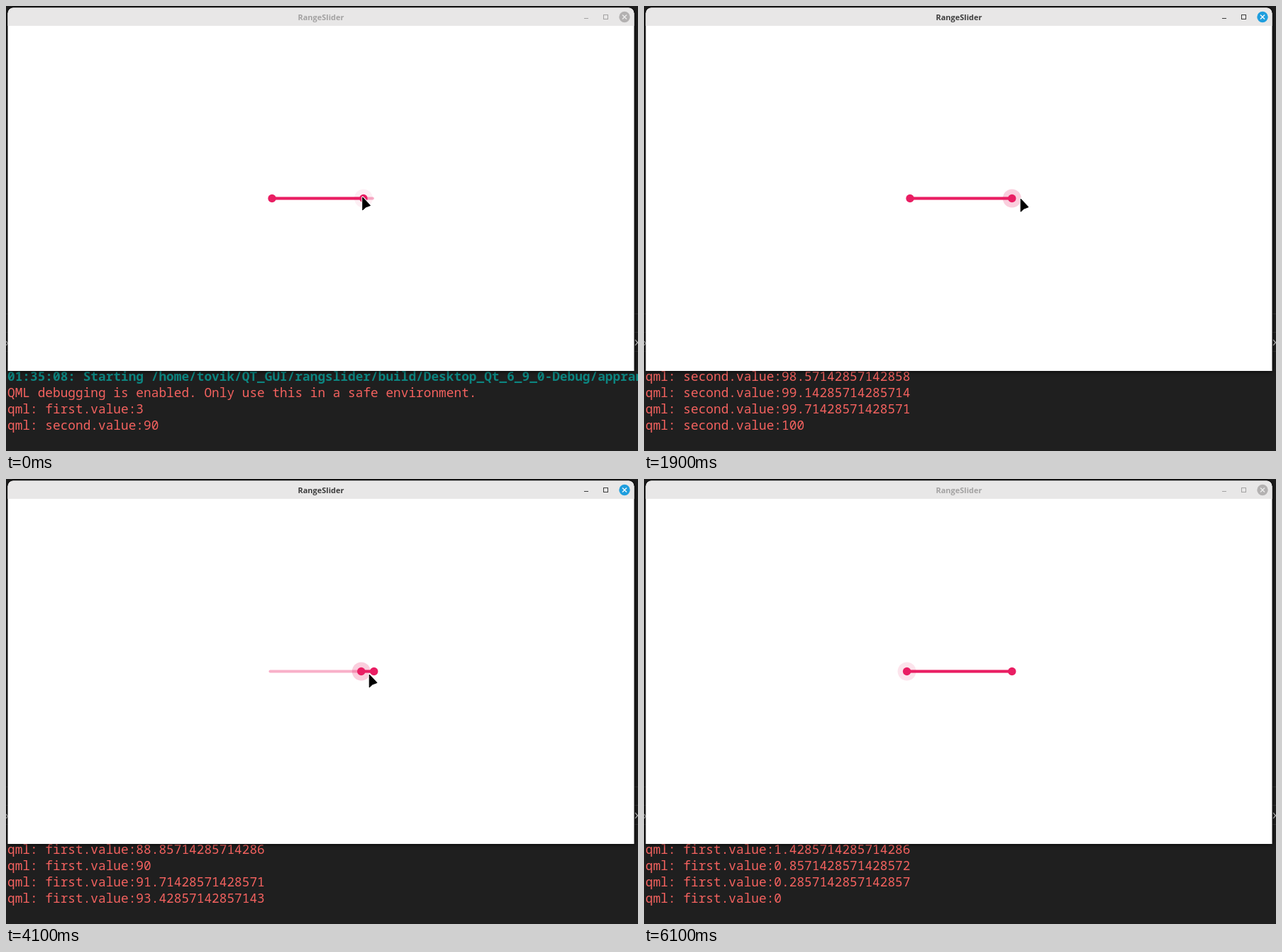
Animation, 891 px wide and 628 px high, one loop 6200 ms. Source, as an HTML page with a canvas:

```html
<!DOCTYPE html>
<html lang="en">
<head>
<meta charset="utf-8">
<title>RangeSlider</title>
<style>
  html, body { margin: 0; width: 100%; height: 100%; overflow: hidden; background: #1f1f1f; }
  canvas { display: block; }
</style>
</head>
<body>
<canvas id="stage" width="891" height="628"></canvas>
<script>
const c = document.getElementById('stage').getContext('2d');
const LOOP = 6200, STEP = 100, PINK = '#e91e63', MID = 271.5;
const INTRO = [
  '01:35:08: Starting /home/tovik/QT_GUI/rangslider/build/Desktop_Qt_6_9_0-Debug/apprangslider...',
  'QML debugging is enabled. Only use this in a safe environment.',
  'qml: first.value:3',
  'qml: second.value:90'];

const ramp = (t, a, b) => Math.max(0, Math.min(1, (t - a) / (b - a)));
const ease = (t, a, b) => { const p = ramp(t, a, b); return p * p * (3 - 2 * p); };

// Slider positions run from 0 to 700. The first handle trails the log, which trails the cursor.
const secondAt = t => 630 - 128 * ramp(t, 200, 1100) + 198 * ramp(t, 1500, 1900);
const firstAt = (t, riseLead = 0, fallLead = 0) =>
  21 + 659 * ease(t + riseLead, 3270, 4300) - 680 * ease(t + fallLead, 4430, 5100);
const xOf = n => 370.6 + n * 148.2 / 700;

function cursorAt(t) {
  const drag = xOf(firstAt(t, 126, 115)) - xOf(21);
  const leave = ramp(t, 5200, 5800);
  return [
    502 - 25 * ramp(t, 200, 1100) + 72 * ease(t, 1500, 2100) - 80 * ramp(t, 2200, 2400)
      - 95 * ease(t, 2500, 3000) + drag - 322 * leave,
    270 + 3 * ease(t, 1500, 2100) - 3 * ease(t, 2500, 3000) + 6 * ease(t, 3200, 4000)
      - 8 * ease(t, 4600, 5100) - 266 * leave];
}

const clamp = n => Math.max(0, Math.min(700, n));
const snap = n => n <= 0 || n >= 700 ? clamp(n) : Math.round((n - 2) / 4) * 4 + 2;
const say = (name, n) => `qml: ${name}.value:${n / 700 * 100}`;

function history(name, value, dir, gaps) {
  const n = snap(value);
  const back = n === 0 || n === 700 ? [10, 6, 2, 0] : gaps;
  return back.map(g => say(name, clamp(n - dir * g)));
}

function logLines(t) {
  if (t < 300) return INTRO;
  if (t < 500) return [...INTRO.slice(1), say('second', snap(secondAt(t)))];
  if (t >= 3400) return history('first', firstAt(t, 80, 36), t < 4400 ? 1 : -1, [32, 24, 12, 0]);
  const lines = history('second', secondAt(t), t < 1600 ? -1 : 1, [12, 8, 4, 0]);
  return t < 3200 ? lines : [...lines.slice(1), say('first', 22)];
}

function line(color, width, ...points) {
  c.strokeStyle = color;
  c.lineWidth = width;
  c.beginPath();
  points.forEach(([x, y]) => c.lineTo(x, y));
  c.stroke();
}

function disc(x, y, r, color, alpha = 1) {
  c.globalAlpha = alpha;
  c.fillStyle = color;
  c.beginPath();
  c.arc(x, y, r, 0, 7);
  c.fill();
  c.globalAlpha = 1;
}

function drawConsole(t) {
  c.fillStyle = '#1f1f1f';
  c.fillRect(0, 0, 891, 628);
  c.fillStyle = '#343434';
  for (const y of [434, 460, 487]) {
    c.fillRect(0, y, 3, 1);
    c.fillRect(886, y, 5, 1);
  }
  line('#c8c8c8', 1.2, [0, 473], [2.5, 476], [0, 479]);
  line('#c8c8c8', 1.2, [887, 471], [890.5, 475], [887, 479]);
  c.textAlign = 'left';
  logLines(t).forEach((text, i) => {
    const head = text === INTRO[0];
    c.font = `${head ? 'bold ' : ''}17.8px "Noto Sans Mono", monospace`;
    c.fillStyle = head ? '#0c8580' : '#f4625f';
    c.fillText(text, 2, 529 + i * 22.85);
  });
}

function drawWindow(active) {
  c.save();
  c.beginPath();
  c.roundRect(2.5, 2.5, 883, 512.5, [8, 8, 0, 0]);
  c.shadowColor = '#000';
  c.shadowBlur = 6;
  c.fillStyle = '#fff';
  c.fill();
  c.shadowColor = 'transparent';
  c.clip();
  c.fillStyle = '#e8e7e7';
  c.fillRect(2, 2, 884, 26);
  c.restore();

  const ink = active ? '#3d3d3d' : '#a3a2a2';
  c.font = 'bold 11px "Open Sans", "Noto Sans", sans-serif';
  c.textAlign = 'center';
  c.fillStyle = ink;
  c.fillText('RangeSlider', 444, 19.5);
  line(ink, 1, [815, 17.5], [821, 17.5]);
  c.strokeRect(842.5, 12.5, 6, 6);
  disc(872, 15.5, 7.7, active ? '#1f9ede' : '#b3b1b1');
  const cross = active ? '#fff' : '#efeeee';
  line(cross, 1.2, [869, 12.5], [875, 18.5]);
  line(cross, 1.2, [875, 12.5], [869, 18.5]);
}

function drawSlider(t) {
  const first = xOf(firstAt(t)), second = xOf(secondAt(t));
  c.lineCap = 'round';
  line('#f8b0c9', 3.8, [372.4, MID], [517, MID]);
  line(PINK, 3.8, [first, MID], [second, MID]);
  c.lineCap = 'butt';

  // Halos: faint on hover, stronger while pressed.
  const firstHalo = t < 3000 ? 0 : t < 3200 || t >= 5300 ? .12 : .22;
  const secondHalo = t < 100 ? .07 : t < 300 ? .12 : t < 2100 ? .22 : t < 3400 ? .12 : 0;
  for (const [x, halo] of [[first, firstHalo], [second, secondHalo]]) {
    disc(x, MID, 13, PINK, halo);
    disc(x, MID, 5.7, PINK);
  }
}

function drawCursor(t) {
  if (t >= 5900) return;
  c.save();
  c.translate(...cursorAt(t));
  c.beginPath();
  [[.8, 0], [.8, 18], [5.2, 14], [11.6, 11.5]].forEach(p => c.lineTo(...p));
  c.closePath();
  c.lineJoin = 'round';
  c.lineWidth = 3;
  c.strokeStyle = '#fff';
  c.stroke();
  c.lineWidth = 1;
  c.strokeStyle = c.fillStyle = '#000';
  c.stroke();
  c.fill();
  c.restore();
}

const begin = performance.now();
function draw() {
  const t = Math.floor((performance.now() - begin) % LOOP / STEP) * STEP;
  drawConsole(t);
  drawWindow(t >= 300 && t < 6000);
  drawSlider(t);
  drawCursor(t);
  requestAnimationFrame(draw);
}
draw();
</script>
</body>
</html>
```
